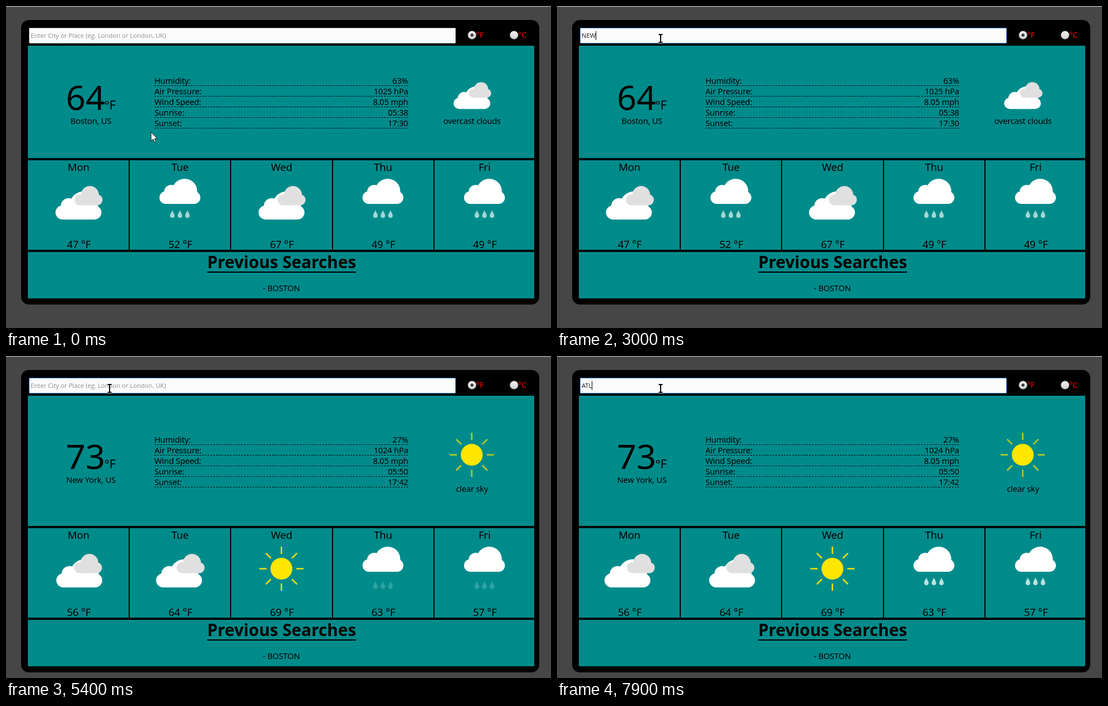
These frames come from a looping animation (973x576 px, 8000 ms). An HTML page:

```html
<!DOCTYPE html>
<html lang="en">
<head>
<meta charset="utf-8">
<title>Weather dashboard</title>
<style>
html, body { margin: 0; width: 100%; height: 100%; overflow: hidden; background: #464646; }
svg { display: block; width: 973px; height: 576px; }
text { font-family: "Noto Sans", "Open Sans", sans-serif; font-size: 14.6px; letter-spacing: -.014em; white-space: pre; }
.mid { text-anchor: middle; }
.end { text-anchor: end; }
.day { font-size: 18.5px; }
.big { font-size: 61px; letter-spacing: 0; }
.unit { font-size: 22px; }
.title { font-size: 29.6px; font-weight: 700; letter-spacing: 0; }
.field { font-family: "Open Sans", "Noto Sans", sans-serif; font-size: 11.25px; letter-spacing: 0; }
.red { fill: #f00; }
.teal { fill: #008b8b; }
</style>
</head>
<body>
<svg id="stage" viewBox="0 0 973 576" xmlns="http://www.w3.org/2000/svg">
  <defs>
    <linearGradient id="knob" x1="0" y1="0" x2="0" y2="1">
      <stop offset="0" stop-color="#f4f4f4"/><stop offset="1" stop-color="#cfcfcf"/>
    </linearGradient>
    <g id="cloud">
      <rect y="-22.500" width="73" height="22.500" rx="11.250"/>
      <circle cx="21" cy="-21.500" r="12.600"/>
      <circle cx="45" cy="-22.500" r="22.500"/>
    </g>
    <g id="puff">
      <rect y="-45" width="50" height="19.500" rx="9.750"/>
      <circle cx="27.500" cy="-44" r="16"/>
    </g>
    <path id="drop" d="M0 0C1 4 4 6.500 4 10A4 4 0 0 1-4 10C-4 6.500-1 4 0 0Z"/>
    <path id="ibeam" d="M-3.500-7H-1L0-6L1-7H3.500M0-6V6M-3.500 7H-1L0 6L1 7H3.500"/>
  </defs>
  <rect width="973" height="576" fill="#464646"/>
  <rect width="973" height="1.300" fill="#b4b4b4"/>
  <g id="views"></g>
  <rect id="field" x="41.500" y="39.500" width="761" height="27" rx="1" fill="#fcfcfc"/>
  <text id="hint" class="field" x="44" y="57" fill="#8c8c8c">Enter City or Place (eg. London or London, UK)</text>
  <text id="typed" class="field" x="44" y="57" fill="#1c1c1c"></text>
  <rect id="caret" y="45" width="1" height="16" fill="#000"/>
  <g fill="url(#knob)" stroke="#8f8f8f" stroke-width=".8">
    <circle cx="832" cy="52" r="7.300"/><circle cx="907" cy="52" r="7.300"/>
  </g>
  <circle cx="832" cy="52" r="2.700" fill="#3c3c3c"/>
  <text class="red" x="839.500" y="57">°F</text>
  <text class="red" x="914.500" y="57">°C</text>
  <path id="arrow" d="M0 0V16L3.700 12.600L6.300 18.300L8.700 17.200L6.200 11.700H11Z" fill="#fff" stroke="#111" stroke-width="1"/>
  <g id="beam" fill="none">
    <use href="#ibeam" stroke="#fff" stroke-width="3.500"/>
    <use href="#ibeam" stroke="#000" stroke-width="2"/>
  </g>
</svg>
<script>
const LOOP = 8000, SWITCH = 4400;
const $ = id => document.getElementById(id);
const labels = ["Humidity:", "Air Pressure:", "Wind Speed:", "Sunrise:", "Sunset:"];
const days = ["Mon", "Tue", "Wed", "Thu", "Fri"];

// Each icon is [kind, time at which its drift or glow is lowest]
const reports = [
  { grow: 0, temp: 64, city: "Boston, US", sky: "overcast clouds", icon: ["cloud", 1700],
    facts: ["63%", "1025 hPa", "8.05 mph", "05:38", "17:30"],
    temps: [47, 52, 67, 49, 49],
    icons: [["cloud", 1700], ["rain"], ["cloud", 1700], ["rain"], ["rain"]] },
  { grow: 32, temp: 73, city: "New York, US", sky: "clear sky", icon: ["sun", 5400],
    facts: ["27%", "1024 hPa", "8.05 mph", "05:50", "17:42"],
    temps: [56, 64, 69, 63, 57],
    icons: [["cloud", 1700], ["cloud", 4400], ["sun", 6650], ["rain"], ["rain"]] }
];

const rect = (x, y, w, h, extra = "") => `<rect x="${x}" y="${y}" width="${w}" height="${h}" ${extra}/>`;
const text = (x, y, cls, str) => `<text x="${x}" y="${y}" class="${cls}">${str}</text>`;
const group = (x, y, inner, scale = 1) => `<g transform="translate(${x} ${y}) scale(${scale})">${inner}</g>`;

// Icons are drawn around the column centre
const draw = {
  cloud: low => `<g data-low="${low}" class="drift">
    <g fill="#fff"><use href="#cloud" transform="scale(1.123)"/></g>
    <g fill="#e0e0e0"><use href="#puff"/></g></g>`,
  rain: () => `<use href="#cloud" x="-36.5" y="-28" fill="#fff"/>
    <g class="drops" fill="#fff">${[-13.5, 0, 13.5].map(x => `<use href="#drop" x="${x}"/>`).join("")}</g>`,
  sun: low => {
    let rays = "";
    for (let a = 0; a < 360; a += 45) rays += `<path d="M26.500 0H39.500" transform="rotate(${a})"/>`;
    return `<circle cy="-33.500" r="19.500" fill="#ffe600"/>
      <g transform="translate(0 -33.500)"><g class="rays" data-low="${low}" stroke="#ffe600" stroke-width="2.600">${rays}</g></g>`;
  }
};

function view(r) {
  const g = r.grow, m = g / 2;
  let s = rect(27, 25, 925, 509 + g, 'rx="14"');
  s += rect(39, 71, 904, 201 + g, 'class="teal"');
  s += rect(39, 276 + g, 904, 160, 'class="teal"');
  s += rect(39, 440 + g, 904, 83, 'class="teal"');

  s += text(107, 186 + m, "big", r.temp) + text(175.5, 185 + m, "unit", "°F");
  s += text(151.7, 211 + m, "mid", r.city);
  labels.forEach((label, i) => {
    const y = 138.5 + m + 19 * i;
    s += text(265, y, "", label) + text(718, y, "end", r.facts[i]);
    s += `<path d="M265 ${y + 4}H718" stroke="#000" stroke-dasharray="3 2"/>`;
  });
  const [kind, low] = r.icon;
  s += kind === "sun" ? group(831.5, 210.3, draw.sun(low)) : group(831.7, 184.3, draw.cloud(low), .8);
  s += text(832, 211 + g, "mid", r.sky);

  days.forEach((day, i) => {
    const x = 129.4 + 181.25 * i;
    s += text(x, 295 + g, "mid day", day);
    s += group(x - .2, 382 + g, draw[r.icons[i][0]](r.icons[i][1]));
    s += text(x + .5, 433 + g, "mid day", r.temps[i] + " °F");
    if (i) s += rect(Math.floor(x - 91), 276 + g, 2, 160);
  });

  s += text(492, 468.5 + g, "mid title", "Previous Searches");
  s += rect(359, 475 + g, 266, 2);
  s += text(491.5, 510 + g, "mid", "- BOSTON");
  return `<g>${s}</g>`;
}

$("views").innerHTML = reports.map(view).join("");
const views = [...$("views").children];
const all = sel => [...document.querySelectorAll(sel)];
const drifts = all(".drift"), drops = all(".drops"), rays = all(".rays");

// Moments when the picture rests: [from, until]
const rests = [[2400, 3000], [4100, 4300], [4500, 4700], [5400, 5600], [5900, 6100],
  [6500, 6700], [7100, 7300], [7300, 7500]];
const typing = [[0, ""], [2300, "N"], [2700, "NE"], [3000, "NEW"], [3200, "NEW "], [3500, "NEW Y"],
  [3700, "NEW YO"], [3900, "NEW YOR"], [4100, "NEW YORK"], [SWITCH, ""],
  [7600, "A"], [7700, "AT"], [7800, "ATL"]];
const caretOn = [[1500, 2000], [2300, SWITCH], [4700, 5300], [6400, 7300], [7600, LOOP]];

const move = (el, x, y) => el.setAttribute("transform", `translate(${x} ${y})`);
const show = (el, on) => { el.style.display = on ? "" : "none"; };
const within = (t, spans) => spans.find(([a, b]) => t >= a && t < b);
const clamp = v => Math.min(1, Math.max(0, v));
const smooth = p => p * p * (3 - 2 * p);

function render(now) {
  let t = Math.floor(now / 100) * 100;
  const rest = within(t, rests);
  if (rest) t = rest[0];

  const second = t >= SWITCH;
  show(views[0], !second);
  show(views[1], second);

  for (const el of drifts) {
    const u = ((t - el.dataset.low) / 3000 + 4) % 2;
    const d = (2 * (u < 1 ? u : 2 - u) - 1) * 3.63;
    move(el.children[0], -41.3 + d, 0);
    move(el.children[1], -6.6 - .62 * d, 0);
  }
  const fall = smooth((t / 1000 + .28) % 1);
  for (const el of drops) {
    move(el, 0, -18.8 + 10 * fall);
    el.setAttribute("opacity", .8 * (1 - fall));
  }
  for (const el of rays)
    el.setAttribute("opacity", .82 - .11 * Math.cos((t - el.dataset.low) / 2500 * 2 * Math.PI));

  const str = typing.filter(([at]) => at <= t).pop()[1];
  $("typed").textContent = str;
  show($("hint"), !str);
  show($("caret"), within(t, caretOn));
  $("caret").setAttribute("x", Math.round(44 + (str ? $("typed").getComputedTextLength() : 0)));
  $("field").setAttribute("stroke", t >= 1500 ? "#3d86e0" : "#a8a8a8");

  const e = smooth(clamp((t - 200) / 800));
  const x = 259 - 74 * e, y = 225.5 - 167.5 * e, inField = y < 68;
  show($("arrow"), !inField);
  show($("beam"), inField);
  move($("arrow"), x, y);
  move($("beam"), x, y);
}

const start = performance.now();
function tick() {
  render((performance.now() - start) % LOOP);
  requestAnimationFrame(tick);
}
tick();
</script>
</body>
</html>
```
